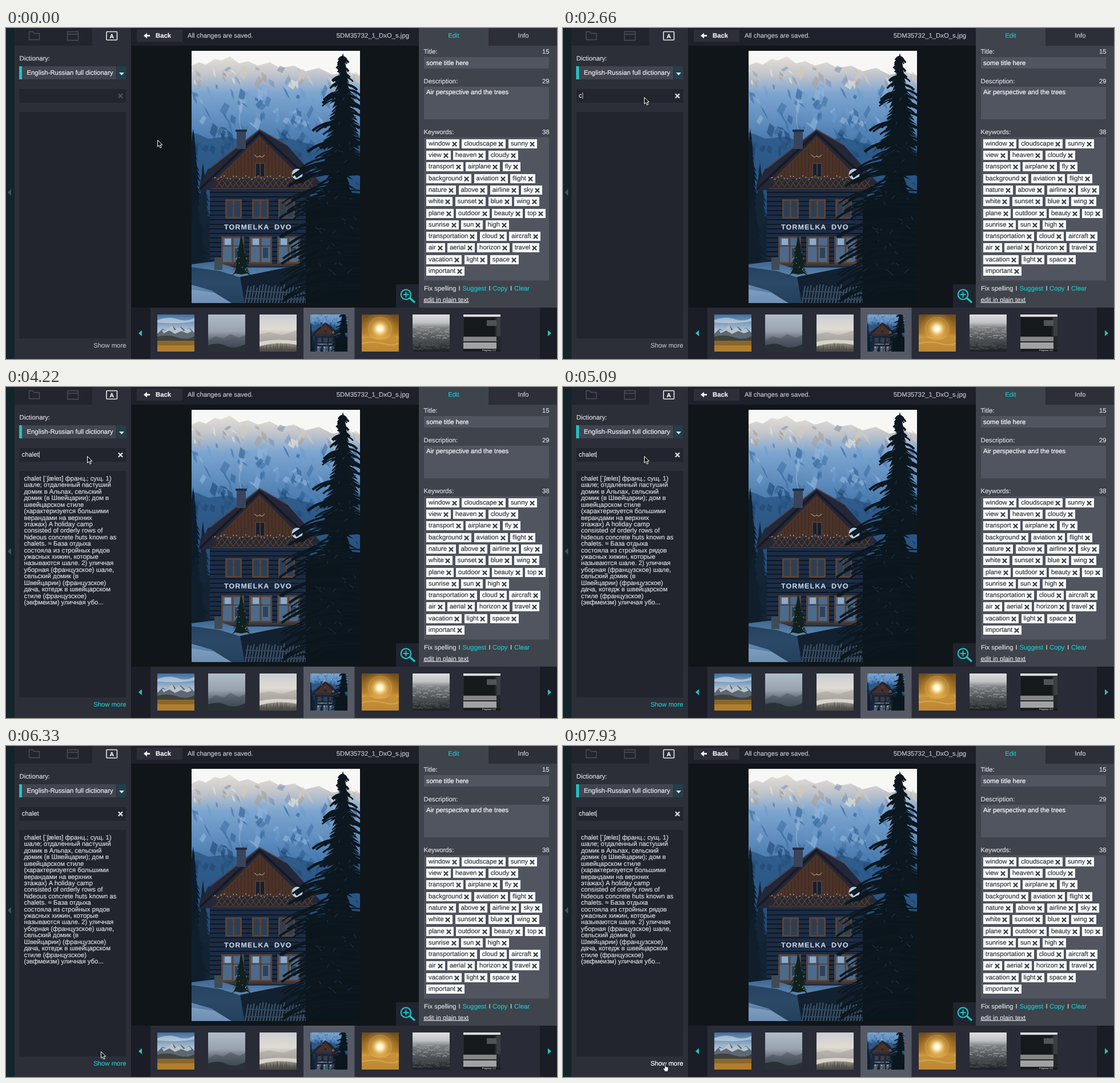
An HTML page that plays this animation: 965 by 580 pixels, repeating every 8000 ms.

```html
<!DOCTYPE html>
<html lang="en">
<head>
<meta charset="utf-8">
<title>Photo keyword editor</title>
<style>
html, body { margin: 0; width: 100%; height: 100%; overflow: hidden; background: #0f1519; }
svg { position: absolute; left: 0; top: 0; }
#stage, text, .row { font: 11.33px "Liberation Sans", Arial, sans-serif; text-rendering: geometricPrecision; }
text { white-space: pre; fill: currentColor; stroke: currentColor; stroke-width: .2px; }
.row { position: absolute; left: 736px; display: flex; gap: 4.4px; }
.tag { height: 16px; line-height: 16px; padding: 0 16px 0 4px; position: relative; background: #fbfcfc; color: #32363e; white-space: nowrap; -webkit-text-stroke: .2px; }
.tag svg { left: auto; right: 4px; top: 4px; }
</style>
</head>
<body>
<svg id="stage" width="965" height="580" viewBox="0 0 965 580"></svg>
<div id="tags"></div>
<svg id="pointer" width="965" height="580"></svg>
<script>
const TEAL = '#1fc3c4', LIGHT = '#d9dce0', IDLE = '#b3b6bb', PANEL = '#2c2e38', DARK = '#23252e';
let seed = 7;
const rnd = (a, b) => {
  seed = (seed * 16807) % 2147483647;
  return a + (b - a) * seed / 2147483647;
};
const pick = list => list[Math.floor(rnd(0, list.length))];
const many = (n, fn) => Array.from({ length: n }, (_, i) => fn(i)).join('');
const rect = (x, y, w, h, fill, more = '') => `<rect x="${x}" y="${y}" width="${w}" height="${h}" fill="${fill}" ${more}/>`;
const path = (d, fill, more = '') => `<path d="${d}" fill="${fill}" ${more}/>`;
const line = (d, stroke, w = 1, more = '') => path(d, 'none', `stroke="${stroke}" stroke-width="${w}" ${more}`);
const disc = (x, y, r, fill) => `<circle cx="${x}" cy="${y}" r="${r}" fill="${fill}"/>`;
const text = (x, y, s, color = LIGHT, more = '') => `<text x="${x}" y="${y}" color="${color}" ${more}>${s}</text>`;
const END = 'text-anchor="end"', MID = 'text-anchor="middle"';
const grad = (id, stops) => `<linearGradient id="${id}" x2="0" y2="1">${
  stops.map(([o, c]) => `<stop offset="${o}" stop-color="${c}"/>`).join('')}</linearGradient>`;

const defs = `<defs>
${grad('snow', [[0, '#e6e0d6'], [.07, '#c3c6cc'], [.15, '#7da5d0'], [.32, '#4f80b4'], [.5, '#396a9c'], [.65, '#264e7a'], [1, '#152b42']])}
${grad('ground', [[0, '#3d6690'], [.5, '#6d93ba'], [1, '#3d6288']])}
${grad('t0', [[0, '#406f9f'], [.4, '#a9bfd2'], [1, '#d0d8df']])}
${grad('t1', [[0, '#b0bcc9'], [.45, '#97a2ae'], [.7, '#5c6670'], [1, '#2a3138']])}
${grad('t2', [[0, '#c9ced3'], [.4, '#e0dbd2'], [.7, '#aaa59e'], [1, '#51504b']])}
${grad('t4', [[0, '#6b4a1b'], [.5, '#b27c2a'], [.65, '#dba545'], [1, '#a66f20']])}
${grad('t5', [[0, '#dddedf'], [.22, '#c0c2c3'], [.36, '#7c7f81'], [1, '#1d2023']])}
<radialGradient id="sun"><stop stop-color="#fff"/><stop offset=".16" stop-color="#fff3c4"/><stop offset=".42" stop-color="#e8b451" stop-opacity=".7"/><stop offset="1" stop-color="#b47b25" stop-opacity="0"/></radialGradient>
</defs>`;

// A ragged conifer: paired branches widening towards the base
function conifer(x, top, bottom, half, steps, fill) {
  const left = [], right = [];
  for (let i = 1; i <= steps; i++) {
    const k = i / steps, y = top + (bottom - top) * k;
    const reach = () => half * Math.pow(k, .85) * rnd(.65, 1.15), l = reach(), r = reach();
    left.push(`L${x - l} ${y + 3}L${x - l * .55} ${y - 2}`);
    right.unshift(`L${x + r * .55} ${y - 2}L${x + r} ${y + 3}`);
  }
  return path(`M${x} ${top}${left.join('')}L${x} ${bottom}${right.join('')}Z`, fill);
}

const windowBox = (x, y, w, h, glass) => rect(x, y, w, h, '#5b4336') +
  many(2, i => rect(x + 3 + i * (w - 3) / 2, y + 3, (w - 9) / 2, h - 6, glass)) +
  line(`M${x + 2} ${y + h * .36}h${w - 4}`, '#463838', 1.5);

// Rock and snow facets: sunlit at the crest, blue in the shade below
function facet() {
  const y = rnd(66, 225), w = rnd(3, 10), h = rnd(5, 20), lean = rnd(-9, 9);
  const color = y < 92 ? pick(['#efe7da', '#a99f99', '#7e94b0', '#d6cabb'])
    : y < 165 ? pick(['#93b7dd', '#2f5f95', '#6c9ccd', '#3d6fa5']) : pick(['#315f90', '#1f4672', '#4474a6']);
  return path(`M${rnd(322, 618)} ${y}l${w} ${h * .4} ${lean} ${h}-${w} -${h * .5}Z`, color, 'opacity=".6"');
}

function mountain() {
  return rect(325, 40, 295, 442, '#f7f7f5') +
    path('M325 66L338 60 350 64 366 54 376 57 392 50 408 62 424 58 441 66 462 60 480 70 505 66 524 76 548 70 572 82 598 76 620 84V482H325Z', 'url(#snow)') +
    many(210, facet) +
    path('M325 182L355 194 390 190 430 204 490 192 540 205 620 190V420H325Z', '#1f4873', 'opacity=".6"') +
    rect(325, 330, 32, 90, '#142333') +
    conifer(328, 176, 340, 20, 18, '#0d1b27') + conifer(345, 235, 345, 15, 13, '#132536') + conifer(333, 290, 415, 24, 13, '#101e2b');
}

function chalet() {
  const logs = many(16, i => line(`M357 ${288 + i * 8}h175`, '#0d1726', 2));
  const planks = many(25, i => line(`M${376 + i * 6} 264V${264 - Math.max(0, 72 - Math.abs(i - 11.5) * 6)}`, '#302423', .8));
  const rail = many(17, i => line(`M${368 + i * 10} 265l10 14m0-14l-10 14`, '#5f4638', 1.2));
  const lights = many(30, i => disc(366 + i * 5.4, 262 + 3 * Math.sin(i * 1.7), .9, '#a9bccf'));
  return path('M412 178Q406 162 412 136', 'none', 'stroke="#9db9d7" stroke-width="2" opacity=".5"') +
    path('M357 278H533V419H357Z', '#1c2c44') + logs +
    path('M444 177L353 248 337 284H364L444 207 522 275 555 276 491 204Z', '#242738') +
    path('M444 190L369 264V282H533L516 262Z', '#4c3328') + planks +
    line('M340 282L444 183 539 272', '#171923', 4) + line('M357 246L444 178 492 205', '#524b56', 1.5) +
    rect(404, 181, 16, 31, '#39445b') + rect(402, 178, 20, 4, '#222c3f') +
    rect(437, 237, 16, 24, '#15202f') + line('M437 237h16v24h-16ZM445 237v24', '#5f4638', 1.5) +
    line('M435 222q5 7 9 2q5 5 9-2', '#a79888', 1.2) +
    rect(364, 262, 177, 20, '#282830') + rail + line('M361 263H541M361 281H541', '#453632', 2) + lights +
    [384, 431, 477].map(x => windowBox(x, 300, 29, 34, '#2b3f56')).join('') +
    text(382, 353, 'TORMELKA  DVO', '#c0d0e2', 'style="font-size:12.5px;font-weight:bold;letter-spacing:1.1px"') +
    line('M411 341Q452 347 508 339', '#25323f', 2) +
    [377, 426, 475].map(x => windowBox(x, 365, 40, 48, '#4c6a8a') + rect(x + 6, 369, 11, 11, '#8faac6') + rect(x + 24, 385, 9, 18, '#2d4258')).join('') +
    line('M357 415H533', '#48392f', 3) + disc(510, 256, 9.5, '#b3cce2');
}

function foreground() {
  const trunk = 590, spread = y => Math.min(112, 6 + (y - 44) * .42);
  const branch = color => {
    const y = rnd(52, 470), w = spread(y) * rnd(.35, 1), side = rnd(0, 1) > .4 ? -1 : 1;
    return line(`M${trunk} ${y - w * .12}q${side * w * .6} ${-w * .05} ${side * w} ${w * .22 + 4}`, color, rnd(2, 5));
  };
  return path('M325 414L365 409 400 420H540V482H325Z', 'url(#ground)') +
    path('M325 419L375 426 440 446 480 482H395L360 460 325 450Z', '#1d3754', 'opacity=".8"') +
    path('M325 458L365 464 395 482H325Z', '#8fb0d0', 'opacity=".6"') +
    rect(365, 402, 14, 22, '#3f4b55') + conifer(412, 362, 432, 17, 14, '#10211f') +
    many(12, () => disc(rnd(402, 422), rnd(385, 427), .8, '#9f9e91')) +
    path('M410 436L500 418 620 425V482H418Z', '#122030') +
    many(22, i => line(`M${424 + i * 5.3} ${452 + rnd(-3, 3)}L${419 + i * 5.3} 482`, '#42566c', 2)) +
    line('M420 461L540 465M418 474L540 476', '#34475b', 2) +
    conifer(trunk, 44, 260, 52, 30, '#0c1720') + conifer(582, 200, 470, 84, 30, '#0b151c') +
    rect(525, 300, 95, 182, '#0b151c') + many(170, () => branch('#0c171f')) +
    many(60, () => {
      const y = rnd(110, 460), w = spread(y) * .8;
      return line(`M${trunk + rnd(-w, 25)} ${y}l${rnd(-8, 8)} ${rnd(2, 7)}`, '#1d3344', 1.2);
    });
}

const photo = mountain() + chalet() + foreground();

const thumbs = [
  rect(0, 0, 65, 65, 'url(#t0)') + path('M0 10Q20 2 35 8T65 6V12Q40 17 0 14Z', '#e7edf1', 'opacity=".5"') +
    path('M0 34L9 25 16 28 26 18 33 27 41 21 49 28 56 23 65 32V47H0Z', '#5d6875') +
    path('M8 27L16 28 26 18 30 28 40 22 46 29 56 24 60 30 52 33 42 29 31 34 21 28 11 33Z', '#d0d9df', 'opacity=".8"') +
    path('M0 39Q18 34 35 40T65 38V48H0Z', '#40423d') + rect(0, 46, 65, 19, '#8a672a') + rect(0, 54, 65, 11, '#b07e2e'),
  rect(0, 0, 65, 65, 'url(#t1)') + path('M0 46L13 38 27 42 39 34 54 41 65 36V65H0Z', '#46515a', 'opacity=".5"') +
    path('M0 54Q18 48 31 55T65 52V65H0Z', '#293137'),
  rect(0, 0, 65, 65, 'url(#t2)') + path('M0 35L18 31 39 36 65 28V48H0Z', '#a9a7a4', 'opacity=".6"') +
    path('M0 48Q24 42 65 46V53Q30 47 0 56Z', '#d9d4ca') +
    many(22, i => conifer(i * 3.1, 50 + rnd(-2, 7), 65, 2.2, 4, '#4c4a43')),
  `<svg width="65" height="65" viewBox="325 113 295 295"><use href="#photo"/></svg>`,
  rect(0, 0, 65, 65, 'url(#t4)') + disc(32, 25, 32, 'url(#sun)') +
    '<circle cx="32" cy="25" r="20" fill="none" stroke="#f0cf82" opacity=".35"/>' +
    path('M0 42Q12 39 23 43T46 41T65 43V65H0Z', '#c48d38', 'opacity=".8"') + line('M0 51Q20 46 38 51T65 50', '#e2b862', 2.5, 'opacity=".5"'),
  rect(0, 0, 65, 65, 'url(#t5)') +
    many(90, () => {
      const y = rnd(20, 63);
      return line(`M${rnd(-4, 62)} ${y}q3-4 7 0`, y < 43 ? '#a3a6a8' : '#55595c', 1.2, 'opacity=".65"');
    }),
  rect(0, 0, 65, 65, '#24272a') + rect(0, 0, 65, 4, '#dadcdb') + rect(1, 6, 54, 32, '#15191b') +
    rect(41, 10, 17, 10, '#515357') + rect(58, 5, 7, 33, '#3b3e41') + rect(0, 39, 58, 8, '#848786') + rect(0, 49, 58, 11, '#a1a3a2') +
    rect(0, 61, 65, 4, '#191b1d') + text(33, 64, 'Progress: 0.0', '#a6aaa9', 'style="font-size:4px"')
];

const cross = (x, y, r, color, more = '') => line(`M${x - r} ${y - r}l${2 * r} ${2 * r}m0 ${-2 * r}l${-2 * r} ${2 * r}`, color, 2.2, more);

const article = `chalet [ˈʃæleɪ] франц.; сущ. 1)
шале; отдаленный пастуший
домик в Альпах, сельский
домик (в Швейцарии); дом в
швейцарском стиле
(характеризуется большими
верандами на верхних
этажах) A holiday camp
consisted of orderly rows of
hideous concrete huts known as
chalets. ≈ База отдыха
состояла из стройных рядов
ужасных хижин, которые
называются шале. 2) уличная
уборная (французское) шале,
сельский домик (в
Швейцарии) (французское)
дача, котедж в швейцарском
стиле (французское)
(эвфмеизм) уличная убо...`;

const leftPanel = rect(0, 0, 15, 580, '#14242b') + path('M9 282V294L3 288Z', '#42525b') +
  rect(15, 0, 204, 580, PANEL) + rect(15, 0, 136, 31, DARK) + rect(219, 0, 1, 580, '#181b21') +
  line('M40.5 20.5V6.5H47L49 9.5H58.5V20.5Z', '#4d515b', 1.3) +
  line('M107.5 6.5H126.5V21.5H107.5ZM107.5 11H126.5', '#4d515b', 1.3) +
  rect(176, 6.5, 18.5, 14.5, 'none', 'rx="1" stroke="#e8eaec" stroke-width="1.6"') +
  text(185.2, 17.5, 'A', '#fff', `${MID} style="font-size:10.5px;font-weight:bold"`) +
  text(23.5, 57, 'Dictionary:') +
  rect(23, 67, 5, 23, TEAL) + rect(28, 67, 165, 23, '#41454f') + rect(194, 67, 16.5, 23, '#233f49') +
  path('M198 78H207L202.5 83Z', LIGHT) + text(36.5, 82, 'English-Russian full dictionary', '#eceef0') +
  rect(23.5, 107, 187, 24, DARK) + text(27.5, 122, '', LIGHT, 'id="query"') + rect(28, 113, 1, 11, '#c4c8cd', 'id="caret"') +
  cross(200.5, 119, 3.6, '#4c505a', 'id="clear"') +
  rect(23.5, 147, 187, 397, DARK) +
  `<g id="article">${article.split('\n').map((s, i) => text(31.5, 164 + i * 11.42, s)).join('')}</g>` +
  text(210.5, 560, 'Show more', IDLE, `${END} id="more"`);

const center = rect(220, 0, 503, 31, '#1e212a') + rect(220, 31, 503, 459, '#0f1519') +
  rect(229, 3, 80, 21, PANEL) + path('M241 13.5L247 8.5V12H252V15H247V18.5Z', '#f0f1f2') +
  text(262, 17, 'Back', '#f0f1f2', 'style="font-weight:bold"') +
  text(318, 17, 'All changes are saved.', '#bfc2c8') + text(706, 17, '5DM35732_1_DxO_s.jpg', '#bfc2c8', END) +
  `<clipPath id="frame">${rect(325, 40, 295, 442, '#000')}</clipPath><g id="photo" clip-path="url(#frame)">${photo}</g>` +
  rect(683, 449, 40, 41, '#20242e') + line('M707 473L716 481', TEAL, 3.2) +
  `<circle cx="700.5" cy="467" r="8.7" fill="none" stroke="${TEAL}" stroke-width="2.2"/>` + line('M695.5 467h10M700.5 462v10', TEAL, 2);

const links = [[732, 'Fix spelling', LIGHT], [792.5, 'I', LIGHT], [799.5, 'Suggest', TEAL], [845.5, 'I', LIGHT],
  [852, 'Copy', TEAL], [883, 'I', LIGHT], [890, 'Clear', TEAL]];
const field = (label, count, y, h) => text(731.5, y, label) + text(951.5, y, count, LIGHT, END) + rect(732, y + 6, 219, h, '#50555f');
const rightPanel = rect(723, 0, 242, 490, '#3e434c') + rect(845, 0, 120, 31, PANEL) +
  text(784, 17, 'Edit', TEAL, MID) + text(906, 17, 'Info', '#c8cbd0', MID) +
  field('Title:', 15, 45, 20) + text(736, 65, 'some title here', '#fff') +
  field('Description:', 29, 97, 57) + text(736, 116, 'Air perspective and the trees', '#fff') +
  field('Keywords:', 38, 185.5, 251) +
  links.map(([x, s, c]) => text(x, 460, s, c)).join('') +
  text(731.5, 479.5, 'edit in plain text', LIGHT, 'text-decoration="underline"');

const strip = rect(220, 490, 745, 90, '#292b36') + rect(220, 490, 33, 90, '#1a1d25') + rect(935, 490, 30, 90, '#1a1d25') +
  path('M238 529.5V540L232 534.7Z', TEAL) + path('M949 529.5V540L955 534.7Z', TEAL) + rect(521, 490, 89.5, 90, '#555a65') +
  thumbs.map((t, i) => `<svg x="${265 + Math.round(i * 89.4)}" y="502" width="65" height="65">${t}</svg>`).join('');

const $ = id => document.getElementById(id);
$('stage').innerHTML = defs + leftPanel + center + rightPanel + strip;

$('tags').innerHTML = `window cloudscape sunny
view heaven cloudy
transport airplane fly
background aviation flight
nature above airline sky
white sunset blue wing
plane outdoor beauty top
sunrise sun high
transportation cloud aircraft
air aerial horizon travel
vacation light space
important`.split('\n').map((row, i) => `<div class="row" style="top:${194.8 + i * 20.29}px">${
  row.split(' ').map(w => `<span class="tag">${w}<svg width="9" height="9">${cross(4.5, 4.5, 3.6, '#3d424b')}</svg></span>`).join('')}</div>`).join('');

$('pointer').innerHTML = path('M.5 .5V12L3.2 9.6 5.2 14 7.2 13 5.2 8.9H9Z', '#111', 'id="arrow" stroke="#fff" stroke-linejoin="round"') +
  path('M3 1Q4.5 0 5 2V6L8.5 6.5Q10 7 9.7 9.5L8.5 14.5H3.5L.5 9.5Q0 7.5 2 8.5L3 9.5Z', '#fff', 'id="hand" stroke="#111" stroke-width=".9"');

// Each track holds [start time, value...] and changes abruptly
const moves = [[0, 265, 196], [150, 242, 170], [420, 222, 160], [577, 202, 150], [735, 181, 140], [892, 160, 130], [1050, 142, 121],
  [5510, 146, 185], [5610, 153, 275], [5700, 160, 360], [5800, 163, 404], [6000, 164, 440], [6110, 165, 482], [6220, 166, 516],
  [6330, 166, 535], [6480, 172, 550], [6680, 175, 556]];
const typing = [[0, ''], [2660, 'c'], [2730, 'cha'], [2790, 'chal'], [2860, 'chalet']];
const blinks = [1350, 1850, 2360, 3320, 3860, 4400, 4910, 5410, 5800, 6330, 6890, 7370, 7820];
const at = (track, t) => track.findLast(k => k[0] <= t);
const show = (id, on) => $(id).setAttribute('visibility', on ? 'visible' : 'hidden');
const start = performance.now();

function draw() {
  const t = Math.max(0, performance.now() - start) % 8000;
  const [, x, y] = at(moves, t), word = at(typing, t)[1];
  $('query').textContent = word;
  show('caret', blinks.filter(b => b <= t).length % 2);
  $('caret').setAttribute('x', word ? 28 + Math.round($('query').getComputedTextLength()) : 28);
  $('clear').setAttribute('stroke', word ? LIGHT : '#4c505a');
  show('article', t >= 4220);
  $('more').setAttribute('color', t < 4220 ? IDLE : t < 7930 ? TEAL : '#fff');
  show('arrow', t < 6680);
  show('hand', t >= 6680);
  for (const id of ['arrow', 'hand']) $(id).setAttribute('transform', `translate(${x} ${y})`);
  requestAnimationFrame(draw);
}
draw();
</script>
</body>
</html>
```
